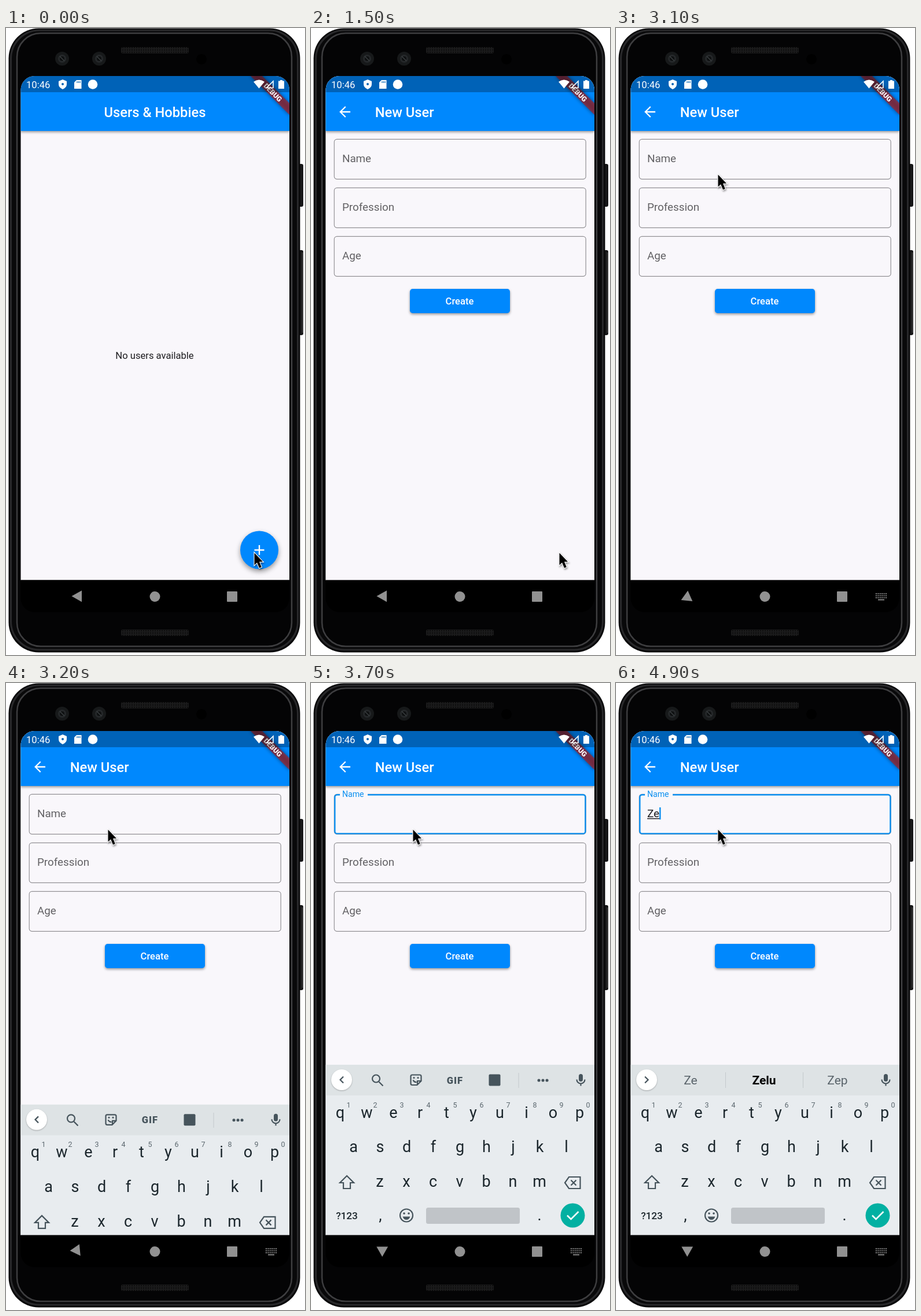
An HTML page for the animation above (5 s loop, 517 by 1084 pixels).

```html
<!DOCTYPE html>
<html lang="en">
<head>
<meta charset="utf-8">
<title>Users &amp; Hobbies</title>
<style>
  html, body { margin: 0; width: 100%; height: 100%; overflow: hidden; background: #fff; }
  svg { display: block; font-family: Roboto, sans-serif; }
  .bar { fill: #0088fd; filter: drop-shadow(0 2px 2px #0006); }
  .title { font-size: 23.7px; font-weight: 500; fill: #fff; }
  .small { font-size: 16.6px; }
  .label { font-size: 18.8px; fill: #626164; }
  .field { fill: none; stroke: #929195; stroke-width: 1.2; }
  .mid { text-anchor: middle; }
  .key { font-size: 27px; fill: #1b262c; }
  .hint { font-size: 12.5px; fill: #5b676e; }
  .word { font-size: 21px; fill: #59636a; }
  .line { fill: none; stroke: #46545c; stroke-width: 2.2; }
  .solid { fill: #46545c; }
</style>
</head>
<body>
<svg width="517" height="1084" viewBox="0 0 517 1084">
  <defs>
    <clipPath id="screen"><path d="M25.5 954.5V107a24 24 0 0 1 24-24H466a24 24 0 0 1 24 24V954.5z"/></clipPath>
    <pattern id="mesh" width="4" height="4" patternUnits="userSpaceOnUse">
      <path d="M0 0h4v4h-4z" fill="#1b1b1c"/><circle cx="2" cy="2" r="1.2" fill="#0b0b0b"/>
    </pattern>
    <g id="lens">
      <circle r="12" fill="#17191a"/><circle r="7" fill="#25282a"/><circle r="4" fill="#0e1011"/>
      <path d="M-4-4L4 4" stroke="#3a3e41" stroke-width="1.5"/>
    </g>
  </defs>

  <!-- Phone body -->
  <path d="M507 235h4q3 0 3 3v68q0 3-3 3h-4zM507 384h4q3 0 3 3v141q0 3-3 3h-4z" fill="#161617"/>
  <path d="M512.5 388v139" stroke="#444" stroke-width="1.5"/>
  <rect x="4.500" y=".5" width="504" height="1079" rx="52" fill="#09090a"/>
  <rect x="8.500" y="4" width="496" height="1071" rx="49" fill="none" stroke="#28282a" stroke-width="3"/>
  <rect x="19" y="9" width="475" height="1060" rx="41" fill="#040405" stroke="#3e3e40" stroke-width="2.500"/>
  <rect x="199" y="33" width="117" height="11" rx="3" fill="url(#mesh)"/>
  <rect x="199" y="1040" width="117" height="11" rx="3" fill="url(#mesh)"/>
  <use href="#lens" x="97" y="53"/><use href="#lens" x="161" y="53"/>
  <circle cx="338" cy="54" r="9" fill="#000"/>

  <g clip-path="url(#screen)">
    <rect x="25" y="83" width="465" height="872" fill="#f9f7fb"/>
    <g id="home">
      <rect class="bar" x="25" y="83" width="465" height="95"/>
      <text class="title mid" x="257.5" y="153.5">Users &amp; Hobbies</text>
      <text class="small mid" x="257" y="572" fill="#1d1c1f">No users available</text>
      <circle cx="438" cy="902.5" r="33" fill="#0088fd" style="filter:drop-shadow(0 4px 4px #0006)"/>
      <circle id="ripple" cx="438" cy="902.5" r="24" fill="#fff" opacity=".2"/>
      <path d="M429.5 902.5h17M438 894v17" stroke="#fff" stroke-width="2.4"/>
    </g>

    <g id="form">
      <rect x="25" y="83" width="465" height="872" fill="#f9f7fb"/>
      <rect class="bar" x="25" y="83" width="465" height="95"/>
      <path d="M68 145H51.5M59.7 136l-9 9 9 9" fill="none" stroke="#fff" stroke-width="2.3"/>
      <text class="title" x="110.7" y="153.5">New User</text>
      <g id="fields"></g>
      <rect id="focus" x="41.2" y="193.2" width="433.2" height="67.2" rx="4" fill="none" stroke="#0b8ff0" stroke-width="2.4"/>
      <rect id="gap" x="50" y="190" height="6" fill="#f9f7fb"/>
      <text id="name" class="label">Name</text>
      <text id="typed" class="label" x="54" y="231.5" style="fill:#1d1c1f"></text>
      <path id="underline" stroke="#1d1c1f" stroke-width="1.3"/>
      <rect id="caret" y="215" width="2.4" height="21" fill="#0b8ff0"/>
      <rect x="171" y="451" width="173" height="42" rx="4.7" fill="#0088fd" style="filter:drop-shadow(0 2px 2px #0006)"/>
      <text class="small mid" x="257" y="478" fill="#fff" font-weight="500">Create</text>
    </g>

    <g transform="translate(490 83) rotate(45)">
      <rect x="-47.4" y="33.2" width="94.8" height="14.2" opacity=".5" style="filter:blur(3px)"/>
      <rect x="-47.4" y="33.2" width="94.8" height="14.2" fill="#b71c1c" opacity=".63"/>
      <text class="mid" y="44.6" font-size="12.1" font-weight="900" fill="#fff">DEBUG</text>
    </g>

    <g id="keyboard">
      <rect x="25" y="660" width="465" height="300" fill="#e8ecef"/>
      <rect x="25" y="660" width="465" height="53" fill="#dee3e5"/>
      <circle cx="53" cy="686" r="18" fill="#fff" style="filter:drop-shadow(0 1px 1px #0004)"/>
      <path id="chevron" class="line"/>
      <g id="tools">
        <path class="line" d="M117.5 689.5l7 7"/><circle class="line" cx="112.5" cy="684" r="6.5"/>
        <path class="line" d="M175 677.5h13q2.500 0 2.500 2.500v8l-7 7h-8.500q-2.500 0-2.500-2.500v-12.500q0-2.500 2.500-2.500zM190 688h-6v6M176.5 686.5q2 4 6 3.500"/>
        <circle class="solid" cx="178" cy="682.5" r="1.5"/><circle class="solid" cx="185" cy="682.5" r="1.5"/>
        <text class="mid solid" x="249" y="692.5" font-size="16.5" font-weight="900" letter-spacing="1">GIF</text>
        <rect class="solid" x="307.5" y="676.5" width="20" height="20" rx="2"/>
        <path d="M359 674v26" stroke="#c3c9cc"/>
        <path d="M394 687h.1M401 687h.1M408 687h.1" stroke="#46545c" stroke-width="5" stroke-linecap="round"/>
      </g>
      <g id="words" class="word mid">
        <text id="guess" x="129" y="694"></text>
        <text x="256" y="694" font-weight="700" fill="#000">Zelu</text>
        <text x="383" y="694">Zep</text>
        <path d="M189.5 673v27M323.5 673v27" stroke="#c3c9cc"/>
      </g>
      <rect class="solid" x="463" y="676" width="7" height="13" rx="3.5"/>
      <path class="line" d="M459.5 685.5a7 7 0 0 0 14 0M466.5 692.5v4"/>
      <g id="keys" class="key mid"></g>
      <path class="line" d="M62 852l12 12h-6v10h-12v-10h-6z"/>
      <path class="line" d="M446 854h19.500v20h-19.500l-7-10zM449.500 859.500l9 9m0-9l-9 9"/>
      <circle class="line" cx="165" cy="920.5" r="11"/>
      <path class="solid" d="M158.500 922.500h13q-2 5.500-6.500 5.500t-6.500-5.500z"/>
      <circle class="solid" cx="161" cy="917" r="1.8"/><circle class="solid" cx="169" cy="917" r="1.8"/>
      <rect x="199" y="907" width="162" height="28" rx="3.5" fill="#c0c4c8"/>
      <circle cx="452.5" cy="920.5" r="21" fill="#02b0a2"/>
      <path d="M443 920.500l6.500 6.500 13-13" fill="none" stroke="#fff" stroke-width="2.5"/>
    </g>

    <!-- Status bar -->
    <rect x="25" y="83" width="465" height="28" fill-opacity=".28"/>
    <g fill="#fff">
      <text class="small" x="35" y="103.5">10:46</text>
      <path d="M98 89l7 3v5q0 6-7 9q-7-3-7-9v-5z"/>
      <path d="M122 90h8.500v15h-12.500v-11z"/>
      <path d="M123 92v3M125.5 92v3M128 92v3" stroke="#0063b3" stroke-width="1.2"/>
      <circle cx="150" cy="97.5" r="8.3"/>
      <path d="M437.5 104.5L428 93q9.500-7 19 0z"/>
      <path d="M462 92v11.500h-11.500z" fill="none" stroke="#fff" stroke-width="1.6"/>
      <path d="M474 90h4v1.500h3v13.500h-10v-13.500h3z"/>
    </g>
    <circle cx="98" cy="97" r="2" fill="#0063b3"/>
  </g>

  <!-- Navigation bar -->
  <path d="M25.5 954.5H490v31.500a24 24 0 0 1-24 24H49.500a24 24 0 0 1-24-24z"/>
  <g fill="#919191">
    <path id="back" d="M-9.700 0L7.800 -9.900V9.900z"/>
    <circle cx="257.5" cy="983" r="9"/>
    <rect x="382" y="974" width="18" height="18" rx="1"/>
    <g id="switcher" stroke="#919191" stroke-width="1.8">
      <path d="M449 978h19M449 981.500h19M449 985h19" stroke-dasharray="1.8 1.6"/>
      <path d="M453 988.500h11"/>
    </g>
  </g>

  <path id="cursor" d="M0 0V21L4.600 16.700 8.500 26 12.300 24.400 8.500 15.300H14.600z" stroke="#fff" stroke-width="2.2"
        paint-order="stroke" style="filter:drop-shadow(1px 2px 1.5px #0006)"/>
</svg>

<script>
const LOOP = 5000, STEP = 100;
const $ = id => document.getElementById(id);
const set = (id, attrs) => Object.entries(attrs).forEach(([k, v]) => $(id).setAttribute(k, v));
const show = (id, on) => { $(id).style.display = on ? '' : 'none'; };
const clamp = x => Math.min(1, Math.max(0, x));
const ease = p => { const q = p ** .7; return q * q * (3 - 2 * q); };
const text = (s, x, y, extra = '') => `<text x="${x}" y="${y}" ${extra}>${s}</text>`;

// Linear interpolation along [time, ...values] stops
function track(t, stops) {
  const i = stops.findIndex(s => s[0] > t);
  if (i === 0) return stops[0].slice(1);
  if (i < 0) return stops.at(-1).slice(1);
  const a = stops[i - 1], b = stops[i], p = (t - a[0]) / (b[0] - a[0]);
  return a.slice(1).map((v, k) => v + (b[k + 1] - v) * p);
}

const CURSOR = [[1700, 429.5, 907.5], [2000, 411, 547], [2300, 190, 262], [2400, 179, 253.5], [2600, 176.5, 253.5]];
const BACK_TURN = [[3000, 0], [3100, 96], [3200, 235], [3300, 270]];

$('fields').innerHTML = ['', 'Profession', 'Age'].map((label, i) =>
  `<rect class="field" x="40.2" y="${192.3 + 84 * i}" width="435" height="69" rx="4.7"/>` +
  text(label, 54, 232.4 + 84 * i, 'class="label"')).join('');

const row = (letters, x, y) => [...letters].map((c, i) => text(c, x + 46 * i, y)).join('');
$('keys').innerHTML =
  row('qwertyuiop', 50.5, 751.5) + row('asdfghjkl', 73.5, 811) + row('zxcvbnm', 119, 871) +
  `<g class="hint">${row('1234567890', 65, 733.5)}</g>` +
  text('?123', 62, 927, 'style="font-size:17.2px;font-weight:500"') +
  text(',', 120, 929) + text('.', 395, 929);

function draw(t) {
  const [x, y] = track(t, CURSOR);
  set('cursor', { transform: `translate(${x} ${y})` });

  // Page change: slide up and fade in
  const page = clamp((t - 600) / 300);
  show('ripple', t >= 600);
  show('form', page > 0);
  set('form', { opacity: page ** 1.6, transform: `translate(0 ${218 * (1 - ease(page))})` });

  // Keyboard and navigation icons
  const rise = clamp((t - 3100) / 220);
  show('keyboard', rise > 0);
  set('keyboard', { transform: `translate(0 ${295 * (1 - rise) ** 2.4})` });
  show('switcher', t >= 3100);
  set('back', { transform: `translate(123.2 982.3) rotate(${track(t, BACK_TURN)})` });

  // Floating label
  const lift = ease(clamp((t - 3300) / 200)), focused = lift > 0;
  set('name', { transform: `translate(54 ${232.4 - 35.4 * lift}) scale(${1 - .25 * lift})` });
  $('name').style.fill = focused ? '#0b8ff0' : '';
  show('focus', focused);
  set('gap', { width: 48 * lift });

  // Typing
  const typed = t < 4500 ? '' : t < 4800 ? 'Z' : 'Ze';
  $('typed').textContent = $('guess').textContent = typed;
  const end = 54 + (typed ? $('typed').getComputedTextLength() : 0);
  set('underline', { d: `M54 234.5H${end}` });
  show('underline', typed);
  set('caret', { x: end });
  show('caret', typed || t >= 3300 && (t - 3200) % 1000 < 500);
  show('tools', !typed);
  show('words', typed);
  set('chevron', { d: typed ? 'M50 680.5l5.5 5.5-5.5 5.5' : 'M56 680.5l-5.5 5.5 5.5 5.5' });
}

const start = performance.now();
function tick() {
  const t = (performance.now() - start) % LOOP;
  draw(Math.floor(t / STEP) * STEP);
  requestAnimationFrame(tick);
}
tick();
</script>
</body>
</html>
```
